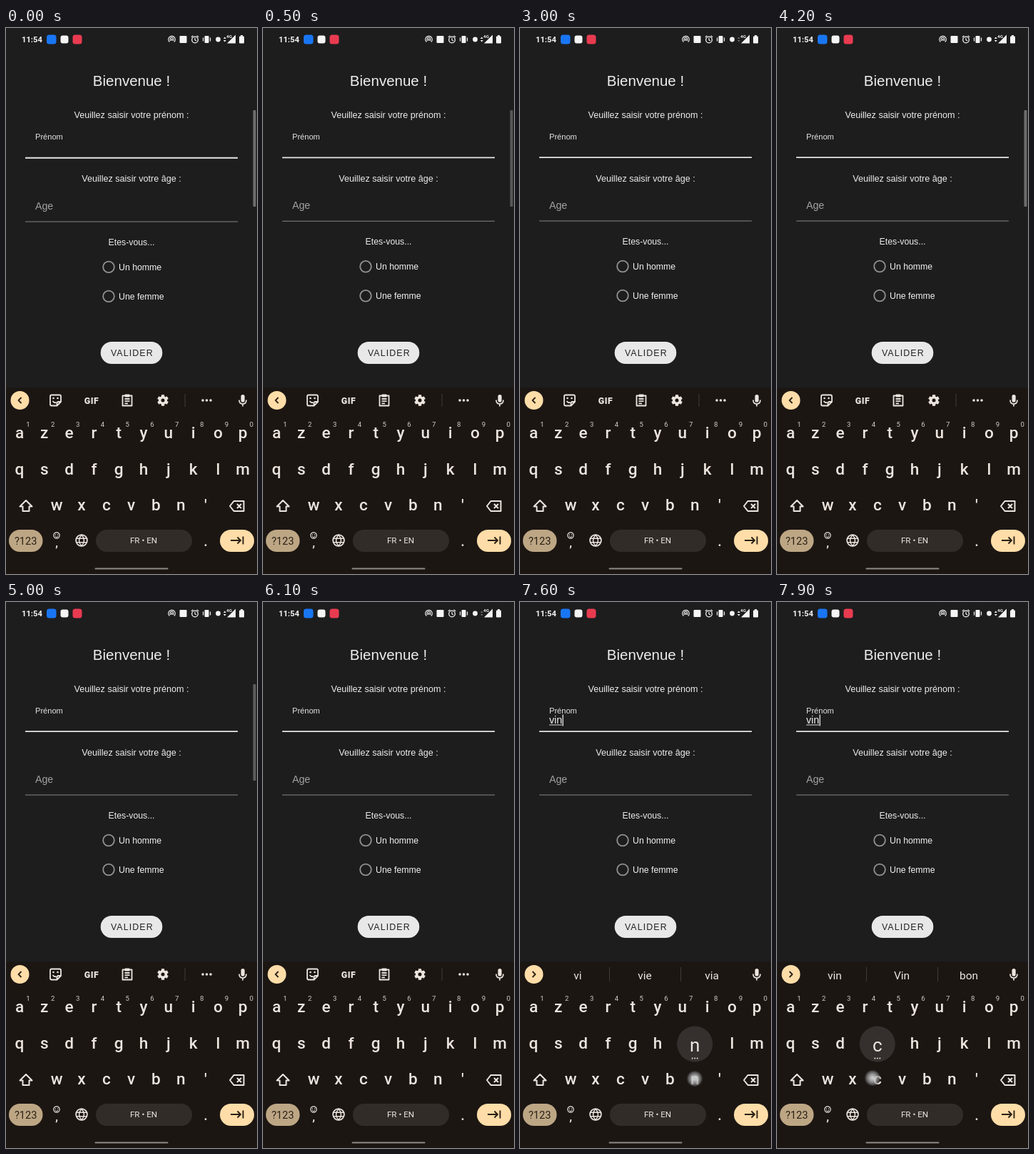
Write an HTML page with a canvas that moves like this. It is 352 px wide and 764 px high and loops after 8 s.

```html
<!DOCTYPE html>
<html lang="fr">
<head>
<meta charset="utf-8">
<title>Bienvenue</title>
<style>
html, body { margin: 0; width: 100%; height: 100%; overflow: hidden; background: #1d1d1e; }
canvas { display: block; width: 352px; height: 764px; }
</style>
</head>
<body>
<canvas id="stage"></canvas>
<script>
const W = 352, H = 764, LOOP = 8000;
const canvas = document.getElementById('stage');
const c = canvas.getContext('2d');
const ratio = window.devicePixelRatio || 1;
canvas.width = W * ratio;
canvas.height = H * ratio;

const APP = '#1d1d1e', BOARD = '#1c1613', INK = '#ece5df', PEACH = '#ffdda8';
const FORM_FACE = '"Liberation Sans", Arial, sans-serif';
const KEY_FACE = 'Roboto, sans-serif';
const ROWS = ['azertyuiop', 'qsdfghjklm', "wxcvbn'"];
const ROW_BASE = [574, 625, 675];
const PITCH = 34.8;

const presses = [
  { key: 'v', from: 6400, to: 6700, x: 175, y: 668 },
  { key: 'i', from: 6900, to: 7200, x: 269, y: 569 },
  { key: 'n', from: 7500, to: 7800, x: 245, y: 667 },
  { key: 'c', from: 7900, to: 8200, x: 134, y: 666 }
];
const typed = [[6500, 'v'], [7000, 'vi'], [7600, 'vin']];
const hints = [
  [6600, ['v', 'vous', 'va']],
  [7200, ['vi', 'vie', 'via']],
  [7800, ['vin', 'Vin', 'bon']]
];
const traffic = [[0, 1000], [4200, 5900], [7500, 8000]];

let face = KEY_FACE;

const clamp = v => Math.max(0, Math.min(1, v));
const latest = (list, t) => list.reduce((found, [at, value]) => t >= at ? value : found, null);

function text(s, x, y, size, color = '#ededed', align = 'center', weight = 400, spacing = 0) {
  c.font = `${weight} ${size}px ${face}`;
  c.letterSpacing = spacing + 'px';
  c.textAlign = align;
  c.fillStyle = color;
  c.fillText(s, x, y);
}

function box(x, y, w, h, r, color) {
  c.fillStyle = color;
  c.beginPath();
  c.roundRect(x, y, w, h, r);
  c.fill();
}

function disc(x, y, r, color) {
  c.fillStyle = color;
  c.beginPath();
  c.arc(x, y, r, 0, Math.PI * 2);
  c.fill();
}

function ring(x, y, r, color, width, from = 0, to = Math.PI * 2) {
  c.strokeStyle = color;
  c.lineWidth = width;
  c.beginPath();
  c.arc(x, y, r, from, to);
  c.stroke();
}

function path(d, x, y, color = INK, width = 1.8, fill = false) {
  c.save();
  c.translate(x, y);
  c.lineWidth = width;
  c.lineJoin = 'round';
  c.strokeStyle = c.fillStyle = color;
  const p = new Path2D(d);
  if (fill) c.fill(p); else c.stroke(p);
  c.restore();
}

function statusBar(t) {
  const white = '#f4f4f4';
  face = KEY_FACE;
  text('11:54', 22, 20, 11.2, white, 'left', 700);
  box(57, 9.5, 13.5, 13, 3.5, '#1976f3');
  box(76.5, 10.5, 11, 11, 3, white);
  box(93.5, 9.5, 13, 13, 3.5, '#e93b50');

  ring(232.5, 16, 4.7, white, 1.3, 2.3, 7.1);
  ring(232.5, 16, 2.5, white, 1.1, 2.3, 7.1);
  disc(232.5, 16.5, 1.2, white);
  box(243.5, 11, 10, 10, 1, white);

  ring(265, 16.5, 4.3, white, 1.3);
  path('M0-2.5V.4L2 1.6M-5.2-3.4L-2.6-5.6M5.2-3.4L2.6-5.6', 265, 16.3, white, 1.2);
  box(278.5, 11, 6, 10, 1, white);
  path('M-5-2.5V2.5M5-2.5V2.5', 281.5, 16, white, 1.2);
  disc(297.5, 16, 3.4, white);

  const busy = traffic.some(([a, b]) => t >= a && t < b);
  const arrow = busy ? white : '#6c6c6c';
  path('M-2-1L0-3.5L2-1ZM-2 1L0 3.5L2 1Z', 306.8, 16, arrow, 1, true);
  path('M-6 6L6-6V6Z', 316, 15.5, white, 1, true);
  text('4G', 313, 14, 6.2, white, 'center', 700);
  box(327, 11.5, 7, 10, 1, white);
  box(329, 10, 3, 2, 0, white);
}

function form(t) {
  const dy = 0.9 * (1 - clamp(t / 700));
  face = FORM_FACE;
  text('Bienvenue !', 176, 81, 20.5);
  text('Veuillez saisir votre prénom :', 176, 125.8, 12.6);
  text('Prénom', 41, 155.5 + dy * 0.4, 11.1, '#e4e4e4', 'left');
  box(27, 180.2 + dy * 0.7, 298, 1.8, 0, '#e6e6e6');
  text('Veuillez saisir votre âge :', 176, 214.5 + dy, 12.6);
  text('Age', 41, 252.6 + dy, 14.2, '#a2a2a2', 'left');
  box(27, 269.5 + dy, 298, 1, 0, '#858585');
  text('Etes-vous...', 176, 303.2 + dy * 0.6, 12.3);
  [['Un homme', 333.5], ['Une femme', 374.5]].forEach(([label, y]) => {
    ring(144, y + dy, 7.8, '#929292', 1.8);
    text(label, 158, y + 4.2 + dy, 12.3, '#f2f2f2', 'left');
  });
  box(132.7, 439, 86.6, 31, 15.5, '#e8e8e8');
  text('VALIDER', 176.8, 458.8, 12.4, '#222', 'center', 400, 1.1);

  const word = latest(typed, t);
  if (word) {
    text(word, 41, 170, 14.2, '#f0f0f0', 'left');
    const end = 41 + c.measureText(word).width;
    box(41, 171.5, end - 41, 1, 0, '#d8d8d8');
    box(end + 0.4, 157.5, 1.2, 16, 0, '#fff');
  }
}

function scrollBar(t) {
  const alpha = t < 4200 ? 1 - clamp((t - 400) / 400) : 1 - clamp((t - 4950) / 250);
  c.globalAlpha = alpha;
  box(346.5, 115, 4, 135, 1, '#6d6d6d');
  c.globalAlpha = 1;
}

function toolbar() {
  // Sticker
  path('M-7.5-5.5Q-7.5-7.5-5.5-7.5H5.5Q7.5-7.5 7.5-5.5V2L2 7.5H-5.5Q-7.5 7.5-7.5 5.5ZM2 7V4Q2 2 4 2H7M-4 1Q-2 4 1 3', 69.5, 521);
  disc(66.5, 518, 1.3, INK);
  disc(72.5, 518, 1.3, INK);
  text('GIF', 120, 525.5, 12.4, INK, 'center', 900, 0.5);
  // Clipboard
  path('M-6.5-6.5H6.5V7.5H-6.5ZM-3.5-2H3.5M-3.5 1.2H3.5M-3.5 4.4H1', 170, 521);
  box(166.5, 512.5, 7, 4, 1, INK);
  // Gear
  ring(220, 521, 4.3, INK, 3.6);
  for (let i = 0; i < 6; i++) {
    const a = (i + 0.5) * Math.PI / 3;
    c.lineWidth = 4.2;
    c.beginPath();
    c.moveTo(220 + 5 * Math.cos(a), 521 + 5 * Math.sin(a));
    c.lineTo(220 + 7.8 * Math.cos(a), 521 + 7.8 * Math.sin(a));
    c.stroke();
  }
  box(250.5, 512, 1, 18, 0, '#413a36');
  [276, 281.5, 287].forEach(x => disc(x, 521, 1.8, INK));
}

function topStrip(t) {
  const words = latest(hints, t);
  disc(19.5, 521, 13, PEACH);
  path(words ? 'M-2-4L2 0L-2 4' : 'M2-4L-2 0L2 4', 19.5, 521, '#2b2015', 1.8);
  if (words) {
    words.forEach((w, i) => text(w, 81 + i * 94, 527.5, 15.5, INK));
    [125, 225].forEach(x => box(x, 511, 1, 20, 0, '#413a36'));
  } else toolbar();
  box(329.5, 513, 5.2, 10.5, 2.6, INK);
  path('M-5-1Q-5 4.5 0 4.5Q5 4.5 5-1M0 4.5V8', 332, 521.5, INK, 1.7);
}

function keyPos(key) {
  const row = ROWS.findIndex(r => r.includes(key));
  const col = ROWS[row].indexOf(key) + (row === 2 ? 1.5 : 0);
  return { x: 19 + col * PITCH, y: ROW_BASE[row] };
}

function keyboard(t) {
  face = KEY_FACE;
  box(0, 503.5, W, H - 503.5, 0, BOARD);
  topStrip(t);
  ROWS.forEach(row => [...row].forEach(key => {
    const { x, y } = keyPos(key);
    text(key, x, y, 22.6, INK, 'center', 500);
  }));
  [...'1234567890'].forEach((n, i) => text(n, 31 + i * PITCH, 557.7, 9.6, '#d6ccc4'));

  // Shift and backspace
  path('M0-8L8.5 .5H4.5V7H-4.5V.5H-8.5Z', 28, 669, INK, 2);
  path('M-10 0L-4.5-7H9.5V7H-4.5ZM0-3L6 3M6-3L0 3', 324, 669, INK, 2);

  box(4, 702, 47.5, 31, 15.5, '#bda684');
  text('?123', 27.7, 722.5, 14.6, '#2b2118');
  ring(71, 710, 4.2, INK, 1.2);
  ring(71, 710.4, 2.1, INK, 1, 0.2, 2.95);
  disc(69.4, 709, 0.7, INK);
  disc(72.6, 709, 0.7, INK);
  text(',', 71, 726, 17, INK, 'center', 500);

  ring(106, 717, 7.9, INK, 1.7);
  path('M-7-2.8H7M-7 2.8H7M0-7.8Q-7 0 0 7.8Q7 0 0-7.8', 106, 717, INK, 1.4);
  box(126, 702, 135, 31, 15.5, '#322c29');
  text('FR • EN', 193, 721.2, 11.6, INK);
  text('.', 280, 725, 20, INK, 'center', 500);
  box(300, 702, 48, 31, 15.5, PEACH);
  path('M-9 0H5M.5-4.5L5 0L.5 4.5M8.5-5.5V5.5', 324, 717, '#2b2015', 1.9);
  box(124.5, 755.6, 103, 2, 1, '#8d8986');
}

function touch(t) {
  const press = presses.find(p => t >= p.from && t < p.to);
  if (!press) return;
  const { x, y } = keyPos(press.key);
  const cy = y - 56.5;
  disc(x, cy, 25, '#352f2d');
  text(press.key, x, cy + 10, 26, INK);
  [-3.5, 0, 3.5].forEach(d => disc(x + d, cy + 20, 1, INK));

  const glow = c.createRadialGradient(press.x, press.y, 1, press.x, press.y, 12);
  glow.addColorStop(0, 'rgba(222,222,222,.9)');
  glow.addColorStop(0.4, 'rgba(180,180,182,.8)');
  glow.addColorStop(0.75, 'rgba(120,120,122,.6)');
  glow.addColorStop(1, 'rgba(50,48,48,0)');
  disc(press.x, press.y, 12, glow);
}

function draw(now) {
  const t = Math.floor((now % LOOP) / 100) * 100;
  c.setTransform(ratio, 0, 0, ratio, 0, 0);
  box(0, 0, W, H, 0, APP);
  statusBar(t);
  form(t);
  if (t < 800 || (t >= 4200 && t < 5200)) scrollBar(t);
  keyboard(t);
  touch(t);
}

const start = performance.now();
function tick() {
  draw(performance.now() - start);
  requestAnimationFrame(tick);
}
tick();
</script>
</body>
</html>
```
